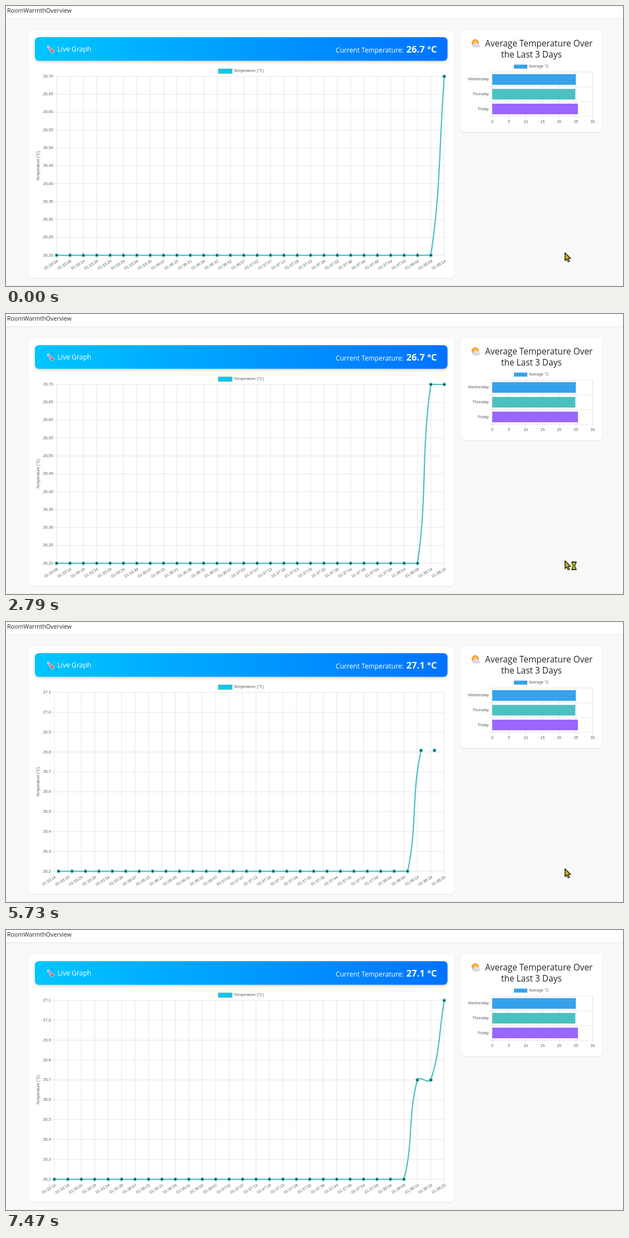
These frames come from a looping animation (1109 px wide and 505 px high, 8000 ms). An HTML page with a canvas:

```html
<!DOCTYPE html>
<html lang="en">
<head>
<meta charset="utf-8">
<title>Temperature dashboard</title>
<style>
  html, body { margin: 0; width: 100%; height: 100%; overflow: hidden; background: #f9f9f9; }
  svg, canvas { position: absolute; left: 0; top: 0; }
  text { font-family: "Open Sans", "Noto Sans", sans-serif; fill: #212529; }
  .card { fill: #fff; filter: drop-shadow(0 1.2px 1.4px rgba(0,0,0,.08)); }
  .banner { filter: drop-shadow(0 2px 2.4px rgba(0,0,0,.2)); }
  .light { fill: #fff; }
</style>
</head>
<body>
<svg width="1109" height="505">
  <defs>
    <linearGradient id="blue"><stop stop-color="#00c6ff"/><stop offset="1" stop-color="#0072ff"/></linearGradient>
  </defs>
  <rect width="1109" height="23" fill="#fff"/>
  <rect y="22.5" width="1109" height="1" fill="#e2e4e6"/>
  <rect y="504" width="1109" height="1" fill="#ececec"/>
  <text x="2" y="11.5" font-size="10.7">RoomWarmthOverview</text>

  <rect class="card" x="40.3" y="44.5" width="765" height="445.5" rx="7"/>
  <rect class="card" x="817" y="44.5" width="255" height="182.5" rx="7"/>
  <rect class="banner" x="52" y="56.3" width="741.5" height="42.5" rx="7" fill="url(#blue)"/>

  <g transform="translate(80 78) rotate(-45)" stroke-linecap="round">
    <path d="M0-6V5" stroke="#d9d3dc" stroke-width="4.4"/>
    <circle cy="5" r="3.3" fill="#d9d3dc"/>
    <path d="M0-4V5" stroke="#e0525f" stroke-width="1.8"/>
    <circle cy="5" r="2.3" fill="#e0525f"/>
  </g>
  <text class="light" x="92.5" y="82.3" font-size="12.2">Live Graph</text>
  <text class="light" x="592.5" y="84" font-size="12.1">Current Temperature:</text>
  <text class="light" id="value" x="719.5" y="84" font-size="16.6" font-weight="700"></text>

  <circle cx="843.5" cy="66.5" r="6.6" fill="#f29a3a"/>
  <circle cx="843.5" cy="66.5" r="4.6" fill="#f8bd4a"/>
  <path d="M841 75a3.1 3.1 0 0 1 .3-6.2a4.4 4.4 0 0 1 8-.4a3.4 3.4 0 0 1 .3 6.6z" fill="#dcdce4"/>
  <text x="861" y="73" font-size="15.45">Average Temperature Over</text>
  <text x="890" y="93" font-size="15.45">the Last 3 Days</text>
</svg>
<canvas id="chart" width="1109" height="505"></canvas>

<script>
const ctx = document.getElementById('chart').getContext('2d');
const valueText = document.getElementById('value');
const LOOP = 8000, DURATION = 1000, COUNT = 30;
const TEAL = '#4bc0c0', GRID = 'rgba(0,0,0,.1)';
const TOP = 127, BOTTOM = 449.6, RIGHT = 787.7, BASE = 26.2;

const seconds = {
  33: '04 09 14 19 24 29 34 39',
  36: '07 15 21 26 31 52 57',
  37: '02 07 13 18 23 28 33 38 44 49 54 59',
  38: '04 09 14 19 25'
};
const times = Object.entries(seconds).flatMap(([m, list]) => list.split(' ').map(s => `01:${m}:${s}`));
const temps = [...Array(29).fill(BASE), 26.7, 26.7, 27.1];

// Each view shows 30 readings, one later than the view before.
const views = [
  { shown: 0, start: -DURATION, left: 91, max: 26.7, ticks: 10, digits: 2, now: '26.7 °C' },
  { shown: 290, start: 262, left: 91, max: 26.7, ticks: 10, digits: 2, now: '26.7 °C' },
  { shown: 5520, start: 5452, left: 87, max: 27.1, ticks: 9, digits: 1, now: '27.1 °C' }
];
const busy = [[1710, 1980], [2790, 3180], [3720, 4380]];

const clamp = (v, lo, hi) => Math.min(hi, Math.max(lo, v));
const mix = (a, b, k) => a + (b - a) * k;

function line(x1, y1, x2, y2) {
  ctx.strokeStyle = GRID;
  ctx.lineWidth = 1;
  ctx.beginPath();
  ctx.moveTo(x1, y1);
  ctx.lineTo(x2, y2);
  ctx.stroke();
}

function label(text, x, y, align, size = 7.1, angle = 0, drop = 0) {
  ctx.save();
  ctx.translate(x, y);
  ctx.rotate(angle);
  ctx.font = `${size}px "Liberation Sans", Arial, sans-serif`;
  ctx.textAlign = align;
  ctx.textBaseline = 'middle';
  ctx.fillStyle = '#5c5c5c';
  ctx.fillText(text, 0, drop);
  ctx.restore();
}

function box(x, y, w, h, color) {
  ctx.fillStyle = color;
  ctx.fillRect(x, y, w, h);
}

const position = (n, i) => {
  const v = views[n];
  return {
    x: mix(v.left, RIGHT, i / (COUNT - 1)),
    y: mix(BOTTOM, TOP, (temps[n + i] - BASE) / (v.max - BASE))
  };
};

// The newest reading has no place (NaN) until the move ends, so canvas skips it.
function readings(n, t) {
  const p = (t - views[n].start) / DURATION;
  const k = 1 - (1 - clamp(p, 0, 1)) ** 4;
  return Array.from({ length: COUNT }, (_, i) => {
    const to = position(n, i);
    if (p >= 1) return to;
    if (i === COUNT - 1) return { x: NaN, y: NaN };
    const from = position(n - 1, i + 1);
    return { x: mix(from.x, to.x, k), y: mix(from.y, to.y, k) };
  });
}

function handles(points, i, left) {
  const cur = points[i], prev = points[i - 1] || cur, next = points[i + 1] || cur;
  const before = Math.hypot(cur.x - prev.x, cur.y - prev.y);
  const after = Math.hypot(next.x - cur.x, next.y - cur.y);
  const at = d => {
    const k = 0.4 * d / (before + after);
    return [
      clamp(cur.x + k * (next.x - prev.x), left, RIGHT),
      clamp(cur.y + k * (next.y - prev.y), TOP, BOTTOM)
    ];
  };
  return { into: at(-before), out: at(after) };
}

function drawLive(n, t) {
  const { left, max, ticks, digits } = views[n];
  for (let i = 0; i <= ticks; i++) {
    const y = mix(BOTTOM, TOP, i / ticks);
    line(left - 5, y, RIGHT, y);
    label(mix(BASE, max, i / ticks).toFixed(digits).replace('.', ','), left - 6.3, y, 'right', 7.2);
  }
  for (let i = 0; i < COUNT; i++) {
    const { x } = position(n, i);
    line(x, TOP, x, BOTTOM + 5);
    label(times[n + i], x, BOTTOM + 6.6, 'right', 7.1, -0.534, 4.3);
  }
  label('Temperature (°C)', 58.5, 288.3, 'center', 7, -Math.PI / 2);

  box(382, 113.8, 24, 7.4, '#00c6ff');
  ctx.strokeStyle = TEAL;
  ctx.lineWidth = 1.8;
  ctx.strokeRect(382, 113.8, 24, 7.4);
  label('Temperature (°C)', 409.5, 117.4, 'left', 7);

  const points = readings(n, t);
  const curves = points.map((_, i) => handles(points, i, left));
  ctx.lineWidth = 2.2;
  ctx.beginPath();
  ctx.moveTo(points[0].x, points[0].y);
  for (let i = 1; i < COUNT; i++) {
    ctx.bezierCurveTo(...curves[i - 1].out, ...curves[i].into, points[i].x, points[i].y);
  }
  ctx.stroke();

  ctx.lineWidth = 1.8;
  ctx.fillStyle = '#111';
  for (const { x, y } of points) {
    ctx.beginPath();
    ctx.arc(x, y, 2.4, 0, 7);
    ctx.fill();
    ctx.stroke();
  }
}

function drawAverages() {
  const left = 874, right = 1054.5, top = 119.2, row = 26.6, bottom = top + 3 * row;
  const days = [['Wednesday', 24.95, '#36a2eb'], ['Thursday', 24.8, TEAL], ['Friday', 25.6, '#9966ff']];
  for (let i = 0; i <= 6; i++) {
    const x = mix(left, right, i / 6);
    line(x, top, x, bottom + 5);
    label(i * 5, x, 209.3, 'center');
  }
  for (let i = 0; i <= 3; i++) line(left - 5, top + i * row, right, top + i * row);
  days.forEach(([name, avg, color], i) => {
    const y = top + (i + 0.5) * row;
    box(left, y - 9.6, (right - left) * avg / 30, 19.2, color);
    label(name, 867.7, y, 'right', 7);
  });
  box(913, 105.7, 24, 7.2, '#36a2eb');
  label('Average °C', 940, 109.2, 'left', 7);
}

function drawCursor(t) {
  if (t >= 7470) return;
  ctx.save();
  ctx.translate(...(t < 7390 ? [1004.7, 445] : [1013.5, 490]));
  ctx.lineWidth = 1.2;
  ctx.lineJoin = 'round';
  ctx.strokeStyle = '#111';
  ctx.fillStyle = '#c2b020';
  const arrow = new Path2D('M0 0V14.2L3.3 11.2L5.6 16.4L8.2 15.3L5.9 10.2H10.2Z');
  ctx.fill(arrow);
  ctx.stroke(arrow);
  if (busy.some(([from, to]) => t >= from && t < to)) {
    ctx.fillStyle = '#a9c916';
    const glass = new Path2D('M12.8 2.5H19.6V5L17.2 9L19.6 13V15.5H12.8V13L15.2 9L12.8 5Z');
    ctx.fill(glass);
    ctx.stroke(glass);
    const caps = new Path2D('M11.6 2.3H20.9M11.6 15.9H20.9');
    ctx.lineWidth = 1.7;
    ctx.stroke(caps);
  }
  ctx.restore();
}

function frame() {
  const t = performance.now() % LOOP;
  const n = views.filter(v => t >= v.shown).length - 1;
  ctx.clearRect(0, 0, 1109, 505);
  valueText.textContent = views[n].now;
  drawLive(n, t);
  drawAverages();
  drawCursor(t);
  requestAnimationFrame(frame);
}
frame();
</script>
</body>
</html>
```
